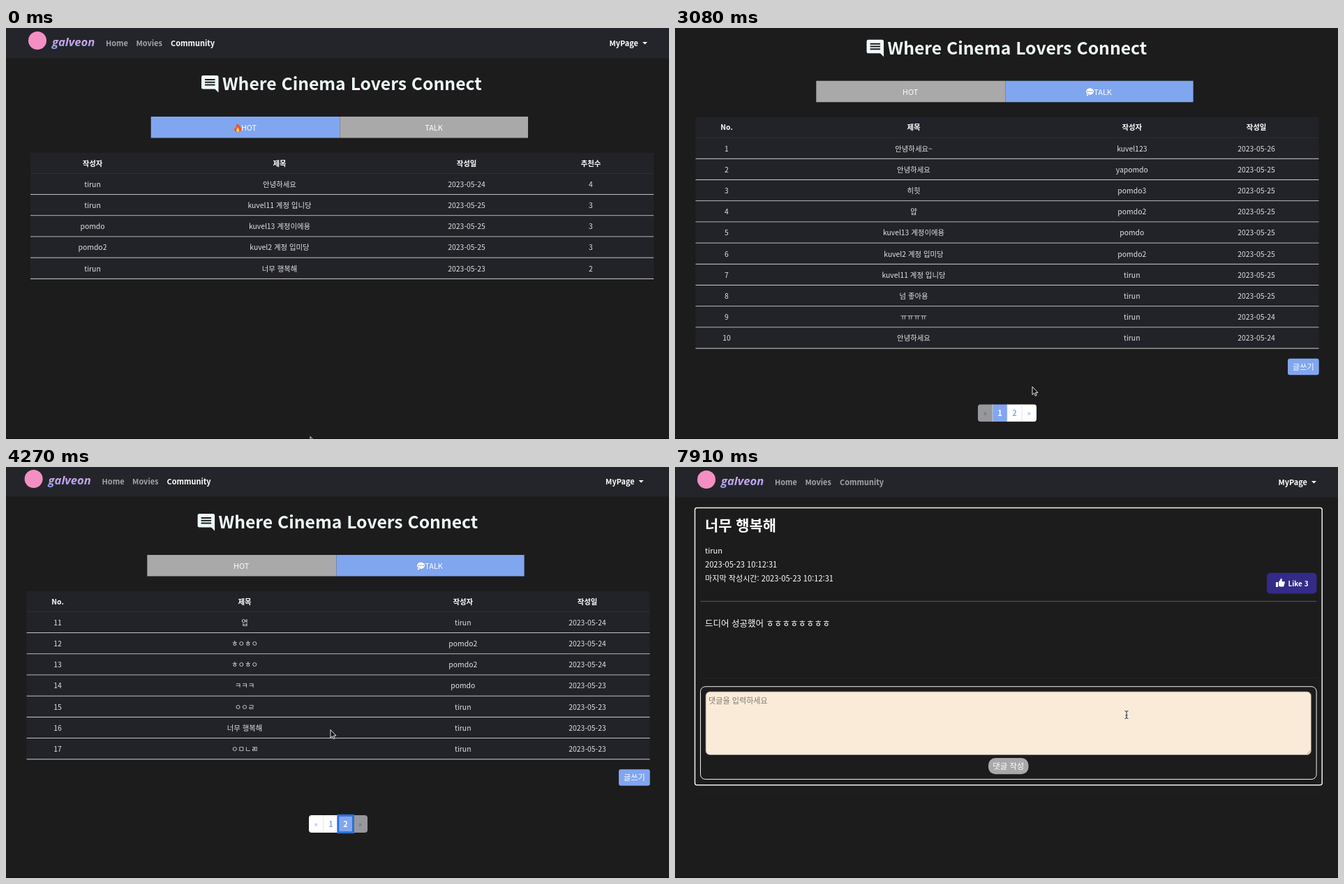
An HTML page for the animation above (8 s loop, 950 by 589 pixels).

```html
<!DOCTYPE html>
<html lang="ko">
<head>
<meta charset="utf-8">
<style>
html, body { margin: 0; width: 100%; height: 100%; overflow: hidden; background: #1c1c1d; }
svg { display: block; width: 950px; height: 589px; font-family: "Noto Sans CJK KR", "Noto Sans CJK", "Noto Sans", sans-serif; }
text { white-space: pre; }
.brand { font: italic 700 16.6px "Open Sans", sans-serif; }
</style>
</head>
<body>
<svg id="stage" viewBox="0 0 950 589">
  <defs>
    <linearGradient id="ink" x2="0" y2="1">
      <stop offset=".15" stop-color="#f3b4dc"/><stop offset=".55" stop-color="#c3a5ee"/><stop offset="1" stop-color="#8fa0f0"/>
    </linearGradient>
  </defs>
  <g id="pages"></g>
  <path d="M0 588.5H950" stroke="#101011"/>
  <g id="pointer">
    <g id="ring" fill="none">
      <circle r="21" stroke="#ddd" fill="#fff" fill-opacity=".06"/>
      <circle r="19.9" stroke="#111" stroke-width="1.4"/>
    </g>
    <path id="arrow" d="M0 0V11.5L2.6 9.2L4.4 13.2L6.2 12.4L4.5 8.6H8Z" fill="#111" stroke="#fff" stroke-width=".9"/>
    <path id="hand" d="M-1 1.2Q0-.6 1 1.2V5L5.4 6.2Q6.3 6.6 6 8L5 11.5H0L-3.6 7.4Q-3.8 6-2.4 6.3L-1 7.4Z" fill="#fff" stroke="#111" stroke-width=".9"/>
    <g id="beam" fill="none">
      <path d="M-2.5-5.5Q0-5.5 0-4Q0-5.5 2.5-5.5M0-4V4M-2.5 5.5Q0 5.5 0 4Q0 5.5 2.5 5.5M-1.5 1H1.5" stroke="#fff" stroke-width="2" opacity=".6"/>
      <path d="M-2.5-5.5Q0-5.5 0-4Q0-5.5 2.5-5.5M0-4V4M-2.5 5.5Q0 5.5 0 4Q0 5.5 2.5 5.5M-1.5 1H1.5" stroke="#222"/>
    </g>
  </g>
</svg>
<script>
const BLUE = '#81a6f0', GREY = '#a9a9a9', PANEL = '#222328', HOVER = '#323337';
const ROW = 30.2, TOP = 208.6, SHIFT = -5.4;
const $ = id => document.getElementById(id);

const text = (x, y, s, size, { fill = '#fff', weight = 400, anchor = 'start', extra = '' } = {}) =>
  `<text x="${x}" y="${y}" font-size="${size}" fill="${fill}" font-weight="${weight}" text-anchor="${anchor}" ${extra}>${s}</text>`;
const mid = (x, y, s, size, o = {}) => text(x, y, s, size, { anchor: 'middle', ...o });
const box = (x, y, w, h, fill, extra = '') =>
  `<rect x="${x}" y="${y}" width="${w}" height="${h}" fill="${fill}" ${extra}/>`;
const line = (x1, x2, y, color) => `<path d="M${x1} ${y}H${x2}" stroke="${color}"/>`;

function nav(dx, active) {
  const link = (x, s, on) => text(x, 25.5, s, 10.9, { weight: 700, fill: on ? '#fff' : '#a4a5a8' });
  return box(0, 0, 950, 43.5, '#24252a') + `<g transform="translate(${dx})">
    <circle cx="45" cy="18" r="13" fill="#f48fc4"/>
    <text class="brand" x="66" y="25.5" fill="url(#ink)">galveon</text>
    ${link(143, 'Home')}${link(186.5, 'Movies')}${link(236, 'Community', active)}${link(864.5, 'MyPage', true)}
    <path d="M912 20H919L915.5 23.6Z" fill="#fff"/></g>`;
}

const flame = `<path d="M331 137Q336 140 336 143Q337.500 142 337 141Q339 149 332 149.500Q326 149 327.500 143Q329 144 329.500 144Q329 140 331 137Z" fill="#f0542d"/>
  <path d="M332 142Q335 146 334 148.500Q331.500 150 330 148Q330 145 332 142Z" fill="#ffd24a"/>`;
const bubble = `<path d="M600 137.500a5.400 4.700 0 1 1-.1 0ZM596 145L595 149L600 146Z" fill="#fff"/>
  <g fill="#555"><circle cx="597" cy="142.300" r=".8"/><circle cx="600" cy="142.300" r=".8"/><circle cx="603" cy="142.300" r=".8"/></g>`;

function heading(talk) {
  return `<g transform="translate(${talk ? SHIFT : 0})">
    <path d="M282.500 68H302Q304.500 68 304.500 70.500V92.500L299.500 87.500H282.500Q280 87.500 280 85V70.500Q280 68 282.500 68Z" fill="#f0fafa"/>
    <path d="M285 74H299.500M285 77.800H299.500M285 81.600H299.500" stroke="#1c1c1d" stroke-width="2"/>
    ${text(310, 89, 'Where Cinema Lovers Connect', 24.7, { weight: 700, fill: '#f0fafa' })}
    ${box(207.7, 127, 271, 30.5, talk ? GREY : BLUE)}${box(478.7, 127, 269.3, 30.5, talk ? BLUE : GREY)}
    ${talk ? `<g transform="translate(0)">${bubble}</g>` : flame}
    ${mid(talk ? 342.5 : 348, 147, 'HOT', 10.9)}${mid(talk ? 618.5 : 613, 147, 'TALK', 10.9)}</g>`;
}

function table(x, centers, head, rows) {
  const cells = (list, y, o) => list.map((s, i) => mid(centers[i], y, s, 10.4, o)).join('');
  return box(x, 179, 893, TOP - 179, PANEL) + cells(head, 197.7, { weight: 700 }) + line(x, x + 893, TOP, '#303238') +
    rows.map((r, i) => {
      const y = TOP + i * ROW;
      return box(x, y + .5, 893, ROW - .5, PANEL, `class="row"`) +
        cells(r, y + 19.2, { weight: 300, fill: '#e2e2e3' }) + line(x, x + 893, y + ROW - .2, '#cfd0d2');
    }).join('');
}

function pager(y, current) {
  const cells = ['«', '1', '2', '»'].map((s, i) => {
    const off = i === (current === 1 ? 0 : 3), on = i === current;
    const fill = off ? '#97989b' : on ? BLUE : '#fff';
    return box(434 + i * 21, y, 21, 25, fill, `id="cell${current}${i}"`) +
      (i ? `<path d="M${434 + i * 21} ${y}v25" stroke="#d5d9e0" stroke-width=".7"/>` : '') +
      mid(444.5 + i * 21, y + 16.6, s, 11, { weight: i % 3 ? 700 : 400, fill: off ? '#66676c' : on ? '#fff' : BLUE });
  }).join('');
  const clip = `<clipPath id="clip${current}"><rect x="434" y="${y}" width="84" height="25" rx="4"/></clipPath>`;
  const focus = current === 2
    ? box(475.8, y + .3, 21.7, 24.4, 'none', 'id="focus" stroke="#2f6fd6"') : '';
  return clip + `<g clip-path="url(#clip${current})">${cells}</g>` + focus;
}

function talk(current, rows) {
  const end = TOP + rows.length * ROW;
  return nav(SHIFT, true) + heading(true) +
    table(29.5, [74, 342, 654.8, 833], ['No.', '제목', '작성자', '작성일'], rows) +
    box(878, end + 14.3, 44.7, 23.5, BLUE, 'rx="3"') + mid(900.3, end + 30.2, '글쓰기', 11.1) +
    pager(+(end + 80).toFixed(1), current);
}

function detail() {
  const outline = (x, y, w, h, r, sw) => box(x, y, w, h, 'none', `rx="${r}" stroke="#f0f0f0" stroke-width="${sw}"`);
  return nav(0, false) + outline(28.5, 58.5, 898.7, 397.2, 3, 1.5) +
    text(43, 90.5, '너무 행복해', 20.9, { weight: 700 }) +
    text(43, 124, 'tirun', 11.1) + text(43, 144.3, '2023-05-23 10:12:31', 11.1) +
    text(43, 164.3, '마지막 작성시간: 2023-05-23 10:12:31', 11.1) +
    box(848, 151.8, 71.5, 29.7, '#332b87', 'rx="5"') +
    `<path d="M861 165H864V172H861ZM865 165L868.500 159.500Q870.500 160 869.500 164H873Q874.500 164.500 873.500 167L872 171.500H867L865 170.500Z" fill="#fff"/>` +
    text(878.5, 170.6, 'Like 2', 10, { weight: 700, extra: 'id="like"' }) +
    line(36.5, 919, 192.5, '#56575a') + text(43, 228.5, '드디어 성공했어 ㅎㅎㅎㅎㅎㅎㅎㅎ', 12.5) +
    line(36.5, 919, 302.5, '#252528') + outline(36.5, 314.7, 882.6, 132.8, 7, 1) +
    box(44, 322, 867.5, 90.5, '#faebd9', 'rx="6" stroke="#85817b" stroke-width=".8"') +
    `<path d="M906 411L910.500 406.500M908.500 411.500L911 409" stroke="#777" stroke-width=".7"/>` +
    text(48, 338.8, '댓글을 입력하세요', 11.1, { fill: '#81796f' }) +
    box(449, 417, 57.5, 23.3, GREY, 'rx="10"') + mid(477.8, 433, '댓글 작성', 11.4) +
    line(28, 928, 467.5, '#202022');
}

const day = n => '2023-05-' + n;
const hotRows = [
  ['tirun', '안녕하세요', day(24), 4], ['tirun', 'kuvel11 계정 입니당', day(25), 3],
  ['pomdo', 'kuvel13 계정이에용', day(25), 3], ['pomdo2', 'kuvel2 계정 입미당', day(25), 3],
  ['tirun', '너무 행복해', day(23), 2]];
const posts = [
  ['안녕하세요~', 'kuvel123', 26], ['안녕하세요', 'yapomdo', 25], ['히힛', 'pomdo3', 25], ['얍', 'pomdo2', 25],
  ['kuvel13 계정이에용', 'pomdo', 25], ['kuvel2 계정 입미당', 'pomdo2', 25], ['kuvel11 계정 입니당', 'tirun', 25],
  ['넘 좋아용', 'tirun', 25], ['ㅠㅠㅠㅠ', 'tirun', 24], ['안녕하세요', 'tirun', 24], ['엽', 'tirun', 24],
  ['ㅎㅇㅎㅇ', 'pomdo2', 24], ['ㅎㅇㅎㅇ', 'pomdo2', 24], ['ㅋㅋㅋ', 'pomdo', 23], ['ㅇㅇㄹ', 'tirun', 23],
  ['너무 행복해', 'tirun', 23], ['ㅇㅁㄴㄻ', 'tirun', 23]
].map(([title, user, d], i) => [i + 1, title, user, day(d)]);

$('pages').innerHTML = [
  nav(0, true) + heading(false) + table(35, [124, 392, 660, 838], ['작성자', '제목', '작성일', '추천수'], hotRows),
  talk(1, posts.slice(0, 10)), talk(2, posts.slice(10)), detail()
].map(s => `<g>${s}</g>`).join('');
const pages = [...$('pages').children];
const rows = pages.map(p => [...p.querySelectorAll('.row')]);

// [time, x, y]
const path = [
  [0, 436, 585.5], [70, 436, 585.5], [210, 522, 396], [840, 522, 396], [1470, 563, 148], [1850, 563, 148],
  [2450, 512, 514], [3500, 512, 514], [3820, 489, 455], [4150, 489, 455], [4270, 465, 376.5],
  [4970, 339, 378], [5250, 341, 378], [5500, 345, 377.5], [5930, 345, 377.5], [6090, 364, 360],
  [6440, 847, 203], [6580, 847, 203], [6860, 884, 170], [7420, 884, 170], [7840, 647, 355], [8000, 647, 355]];
const scrolling = [[0, 0], [2660, 0], [3080, 51], [3290, 108], [3500, 151], [4180, 151], [4181, 1], [5300, 1], [5301, 0], [8000, 0]];
const clicks = [[1500, 1680], [4050, 4180], [5740, 5880], [7000, 7140]];

function at(keys, t, ease = k => k) {
  const i = Math.max(1, keys.findIndex(k => k[0] > t)), a = keys[i - 1], b = keys[i];
  const k = ease((t - a[0]) / (b[0] - a[0]));
  return a.slice(1).map((v, j) => v + (b[j + 1] - v) * k);
}
const smooth = k => k * k * (3 - 2 * k);
const show = (el, on) => el.setAttribute('visibility', on ? 'visible' : 'hidden');

function draw(now) {
  const t = now % 8000;
  const page = t < 1750 ? 0 : t < 4180 ? 1 : t < 5880 ? 2 : 3;
  const [x, y] = at(path, t, smooth), [scroll] = at(scrolling, t);
  pages.forEach((p, i) => p.setAttribute('display', i === page ? 'inline' : 'none'));
  $('pages').setAttribute('transform', `translate(0 ${-scroll})`);

  const settled = page !== 2 || t > 4340;
  const hit = settled && x > 30 && x < 922 ? Math.floor((y + scroll - TOP) / ROW) : -1;
  rows[page].forEach((r, i) => r.setAttribute('fill', i === hit ? HOVER : PANEL));
  $('cell12').setAttribute('fill', t > 3740 ? '#eef1f7' : '#fff');
  $('focus').setAttribute('stroke-width', t < 5300 ? 3 : 1);
  $('like').textContent = t < 7070 ? 'Like 2' : 'Like 3';

  const onTab = page < 2 && y + scroll > 127 && y + scroll < 157;
  const onRow = rows[page][hit] && (page !== 2 || t >= 5040);
  const onLike = page === 3 && x > 848 && y > 152 && y < 181;
  const kind = onTab || onRow || onLike ? 'hand' : page === 3 && y > 322 && y < 412 ? 'beam' : 'arrow';
  for (const id of ['hand', 'beam', 'arrow']) show($(id), id === kind);
  show($('ring'), clicks.some(([a, b]) => t >= a && t < b));
  $('pointer').setAttribute('transform', `translate(${x} ${y})`);
  requestAnimationFrame(draw);
}
requestAnimationFrame(draw);
</script>
</body>
</html>
```
